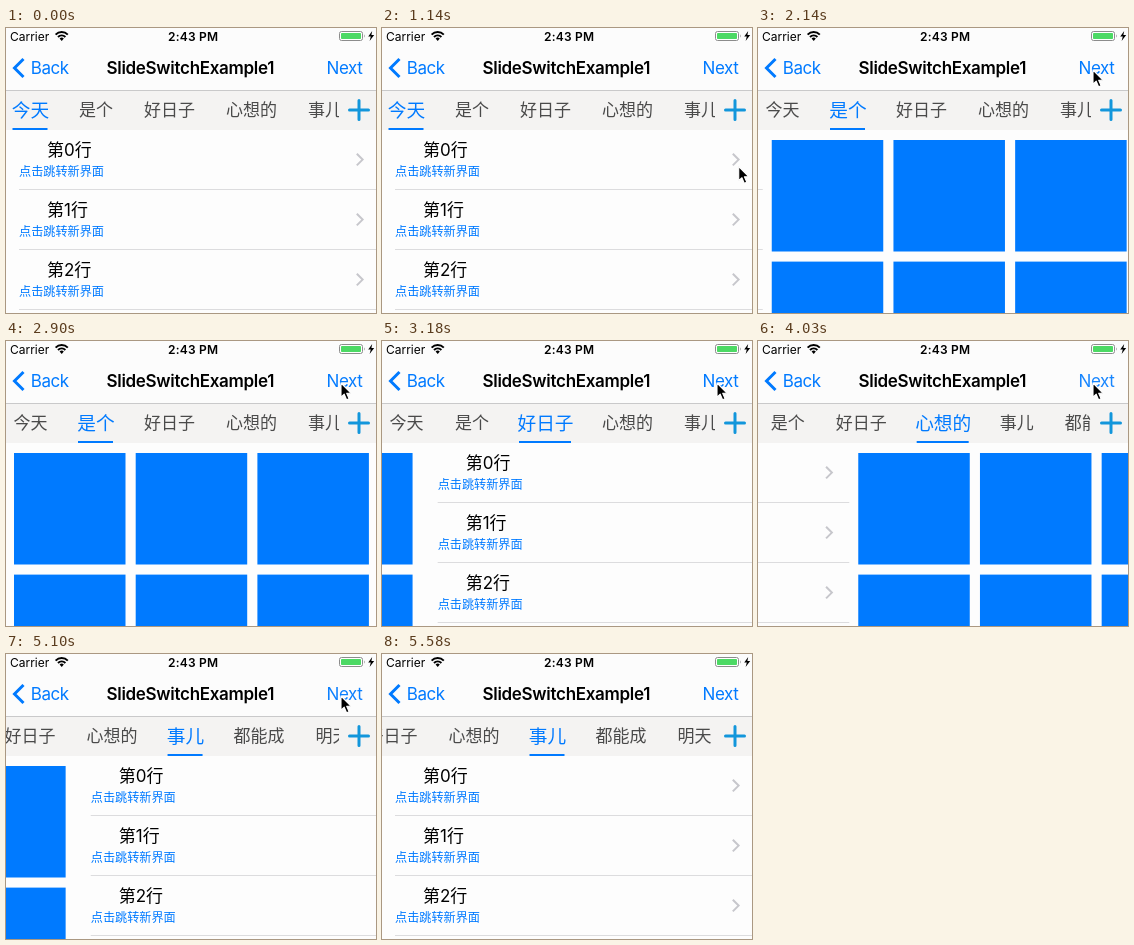
Recreate the animation shown at these times as an HTML page. Size 370 by 285 pixels, loop 6.14 s.

```html
<!DOCTYPE html>
<html lang="zh-CN">
<head>
<meta charset="utf-8">
<title>SlideSwitchExample1</title>
<style>
  html, body { margin: 0; width: 100%; height: 100%; overflow: hidden; background: #fff; }
  svg { display: block; width: 370px; height: 285px; }
  text { font: 17px Inter, "Noto Sans CJK SC", "Noto Sans CJK", sans-serif; white-space: pre; }
  .nav { letter-spacing: -.4px; fill: #007aff; }
  .title { letter-spacing: -.3px; font-weight: 600; }
  .status { font-size: 12px; }
  .time { font-weight: 600; letter-spacing: .2px; }
  .tab { fill: #4a4a4a; text-anchor: middle; }
  .tab.on { fill: #007aff; font-size: 18.7px; }
  .sub { font-size: 12.15px; fill: #007aff; }
</style>
</head>
<body>
<svg viewBox="0 0 370 285">
  <defs>
    <clipPath id="strip"><rect y="63" width="333" height="39"/></clipPath>
    <clipPath id="body"><rect y="102" width="370" height="183"/></clipPath>
  </defs>
  <rect width="370" height="285" fill="#fdfdfd"/>
  <g clip-path="url(#body)"><g id="pages"></g></g>

  <rect width="370" height="62" fill="#fcfcfc"/>
  <text class="status" x="4" y="12.5">Carrier</text>
  <g fill="none" stroke="#000" stroke-width="2">
    <path d="M49.6 6.6a8.6 8.6 0 0 1 12.2 0M52 9a5.3 5.3 0 0 1 7.4 0"/>
    <path d="M53.6 10.6a3 3 0 0 1 4.2 0L55.7 12.9Z" fill="#000" stroke="none"/>
  </g>
  <text class="status time" x="162" y="12.5">2:43 PM</text>
  <rect x="333.5" y="3.5" width="23" height="9" rx="2" fill="#fff" stroke="#8c8c8c"/>
  <rect x="335" y="5" width="20" height="6" rx=".8" fill="#4cd964"/>
  <path d="M358 6.2q1.6 1.8 0 3.6z" fill="#8c8c8c"/>
  <path d="M366.2 3l-4 5.6h2.6L363.6 13l4.6-6h-2.8z"/>

  <path d="M17.5 31L8.5 40l9 9" fill="none" stroke="#007aff" stroke-width="3"/>
  <text class="nav" x="24.7" y="46.2">Back</text>
  <text class="title" x="100.5" y="46.2">SlideSwitchExample1</text>
  <text class="nav" id="next" x="320.5" y="46.2">Next</text>

  <rect y="62" width="370" height="40" fill="#f4f3f2"/>
  <rect y="62" width="370" height="1" fill="#c9c9ca"/>
  <g clip-path="url(#strip)">
    <g id="tabs"><rect id="line" y="100" height="2" fill="#007aff"/></g>
  </g>
  <path d="M343.5 82h19M353 72.5v19" stroke="#1296db" stroke-width="3" stroke-linecap="round"/>
  <path id="cursor" d="M0 0v14.2l3.2-3 2.4 5.6 2.5-1.1-2.4-5.4h4.5z"
        stroke="#fff" stroke-width="1.1" stroke-linejoin="round"/>
</svg>
<script>
const LOOP = 6140, PAGE = 375, SCROLL = 300;
const titles = ['今天', '是个', '好日子', '心想的', '事儿', '都能成', '明天'];
const centers = [24.5, 90, 163.5, 245.5, 319, 392.5, 466];
const tabShift = [0, 0, 0, 80, 153.5];
// [press, scroll start] for each tap on Next
const taps = [[1800, 1863], [2900, 2944], [3770, 3828], [4830, 4885]];

const $ = id => document.getElementById(id);
const clamp = x => Math.min(1, Math.max(0, x));
const smooth = x => (x = clamp(x), x * x * (3 - 2 * x));
const move = (el, x, y = 0) => el.setAttribute('transform', `translate(${x} ${y})`);

function add(parent, tag, attrs, text = '') {
  const el = document.createElementNS('http://www.w3.org/2000/svg', tag);
  for (const k in attrs) el.setAttribute(k, attrs[k]);
  el.textContent = text;
  return parent.appendChild(el);
}

function listPage(g) {
  for (let i = 0; i < 3; i++) {
    const y = 102 + i * 60;
    add(g, 'text', { x: 41, y: y + 26.4 }, `第${i}行`);
    add(g, 'text', { x: 13, y: y + 45.6, class: 'sub' }, '点击跳转新界面');
    add(g, 'path', { d: `M350.8 ${y + 23.8}l5.8 5.8-5.8 5.8`, fill: 'none', stroke: '#c7c7cc', 'stroke-width': 2 });
    add(g, 'rect', { x: 13, y: y + 59, width: 361, height: 1, fill: '#dcdcde' });
  }
}

function gridPage(g) {
  for (let i = 0; i < 6; i++) {
    add(g, 'rect', {
      x: 8 + i % 3 * 121.7, y: 112 + Math.floor(i / 3) * 121.6,
      width: 111.5, height: 111.5, fill: '#007aff'
    });
  }
}

for (let i = 0; i < 5; i++) {
  const g = add($('pages'), 'g', {});
  move(g, i * PAGE);
  (i % 2 ? gridPage : listPage)(g);
}
const tabs = titles.map((s, i) => add($('tabs'), 'text', { x: centers[i], class: 'tab' }, s));

function select(index) {
  tabs.forEach((tab, i) => {
    tab.classList.toggle('on', i === index);
    tab.setAttribute('y', i === index ? 89 : 88.4);
  });
  const width = titles[index].length * 17 + 1;
  $('line').setAttribute('x', centers[index] - width / 2 - .5);
  $('line').setAttribute('width', width);
}

function placeCursor(t) {
  const p = t < 3000 ? 1 - smooth((t - 930) / 490) : clamp((t - 5370) / 210) ** 1.6;
  $('cursor').style.display = t >= 960 && t < 5580 ? '' : 'none';
  move($('cursor'), 335 + 36 * p, 42 + (t < 3000 ? 160 : 180) * p);
}

let selected = -1;
function draw(t) {
  let page = 0, shift = 0, index = 0, alpha = 1;
  taps.forEach(([press, start], i) => {
    const p = smooth((t - start) / SCROLL);
    page += p;
    shift += (tabShift[i + 1] - tabShift[i]) * p;
    if (t >= start) index = i + 1;
    if (t >= press && t < start + 230) {
      alpha = t < start ? 1 - .8 * clamp((t - press) / 40) : .2 + .8 * (t - start) / 230;
    }
  });
  if (index !== selected) select(selected = index);
  move($('pages'), -page * PAGE);
  move($('tabs'), -shift);
  $('next').setAttribute('opacity', alpha);
  placeCursor(t);
}

const begin = performance.now();
function tick() {
  draw((performance.now() - begin) % LOOP);
  requestAnimationFrame(tick);
}
tick();
</script>
</body>
</html>
```
